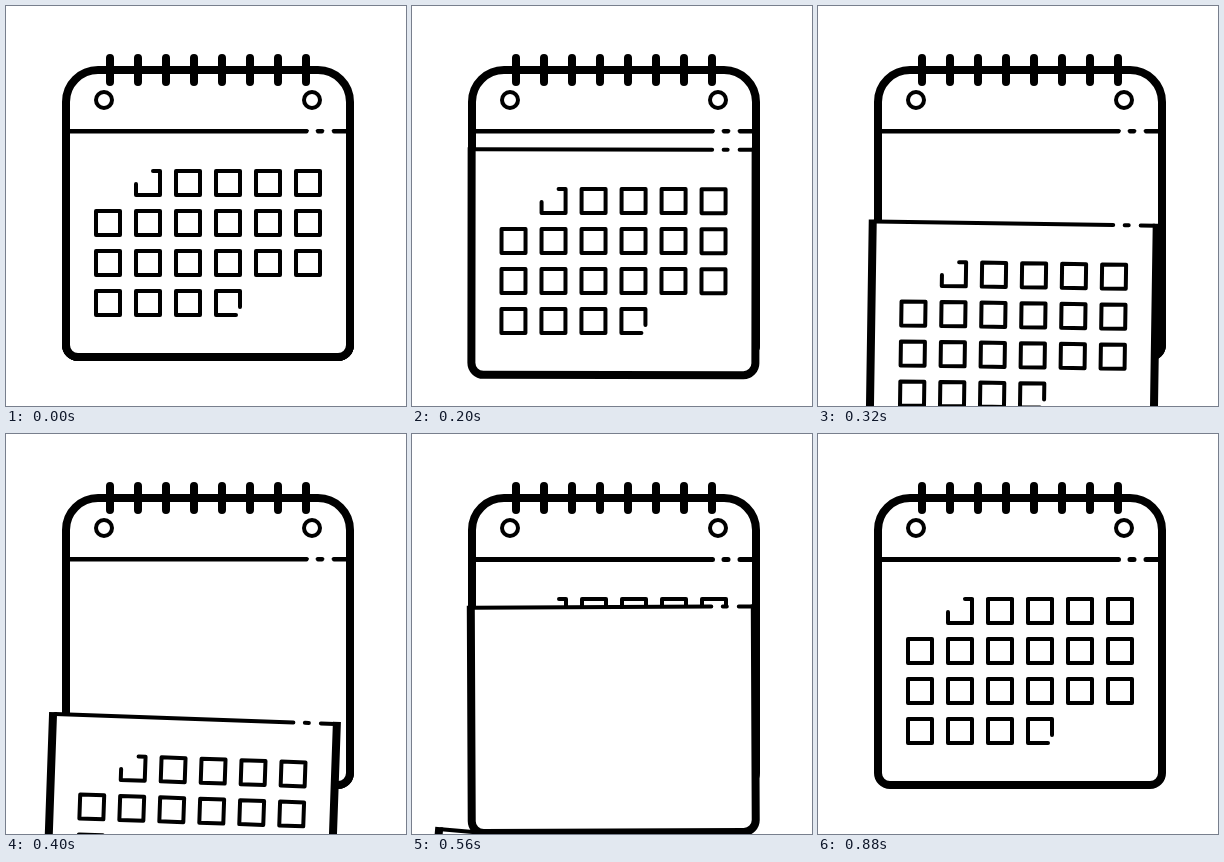
An HTML page that plays this animation: 400 px wide and 400 px high, repeating every 1.12 s.

```html
<!DOCTYPE html>
<html lang="en">
<head>
<meta charset="utf-8">
<title>Calendar</title>
<style>
  html, body { margin: 0; width: 100%; height: 100%; overflow: hidden; background: #fff; }
  svg { display: block; width: 100vw; height: 100vh; fill: none; stroke: #000; stroke-linejoin: round; }
  .thick { stroke-width: 8; }
  .rule { stroke-width: 5; stroke-linecap: round; }
  .edge, .grid { stroke-width: 4; stroke-linecap: round; }
  .paper { fill: #fff; stroke: none; }
</style>
</head>
<body>
<svg viewBox="0 0 400 400">
  <defs>
    <path id="rule" d="M62 125.5H300.5M312 125.5H316M328 125.5H342"/>
    <path id="grid"/>
    <g id="sheet">
      <path class="paper" d="M60 125.5V339a12 12 0 0 0 12 12H332a12 12 0 0 0 12-12V125.5z"/>
      <path class="thick" d="M60 123.5V339a12 12 0 0 0 12 12H332a12 12 0 0 0 12-12V123.5"/>
      <use href="#rule" class="edge"/>
    </g>
  </defs>

  <path class="thick" d="M60 339V96a32 32 0 0 1 32-32H312a32 32 0 0 1 32 32V339a12 12 0 0 1-12 12H72a12 12 0 0 1-12-12z"/>
  <path id="rings" class="thick" stroke-linecap="round"/>
  <g stroke-width="4">
    <circle cx="98" cy="94" r="8"/>
    <circle cx="306" cy="94" r="8"/>
  </g>
  <use href="#rule" class="rule"/>
  <use href="#grid" class="grid"/>

  <g id="blank"><use href="#sheet"/></g>
  <g id="month">
    <use href="#sheet"/>
    <use href="#grid" class="grid"/>
  </g>
</svg>
<script>
  const LOOP = 1120, STEP = 40;
  const $ = id => document.getElementById(id);

  // Day boxes: the first and last ones are left open
  let days = 'M130 178V189H154V165H147M230 309H210V285H234V301';
  [[2, 5], [0, 5], [0, 5], [0, 2]].forEach(([from, to], row) => {
    for (let col = from; col <= to; col++)
      days += `M${90 + col * 40} ${165 + row * 40}h24v24h-24z`;
  });
  $('grid').setAttribute('d', days);

  let rings = '';
  for (let i = 0; i < 8; i++) rings += `M${104 + i * 28} 52v24`;
  $('rings').setAttribute('d', rings);

  // Sine ease-in-out drop; drift and tilt follow from the distance fallen
  function fall(t, start, length, depth) {
    const u = Math.min(1, Math.max(0, (t - start) / length));
    return depth * (1 - Math.cos(Math.PI * u)) / 2;
  }

  function place(id, x, y, tilt) {
    $(id).setAttribute('transform', `translate(${x} ${y}) rotate(${tilt} 202 125.5)`);
  }

  function draw(t) {
    const a = fall(t, 112, 576, 319);
    place('month', -13 * (a / 159) ** 1.65, a, 2 * (a / 159) ** 1.55);

    const b = fall(t, 432, 504, 315);
    place('blank', 0.0008 * b ** 1.8 - 0.043 * b, b, -2.4 * (b / 193) ** 1.6);
  }

  function tick() {
    const t = performance.now() % LOOP;
    draw(Math.floor(t / STEP) * STEP);
    requestAnimationFrame(tick);
  }
  tick();
</script>
</body>
</html>
```
